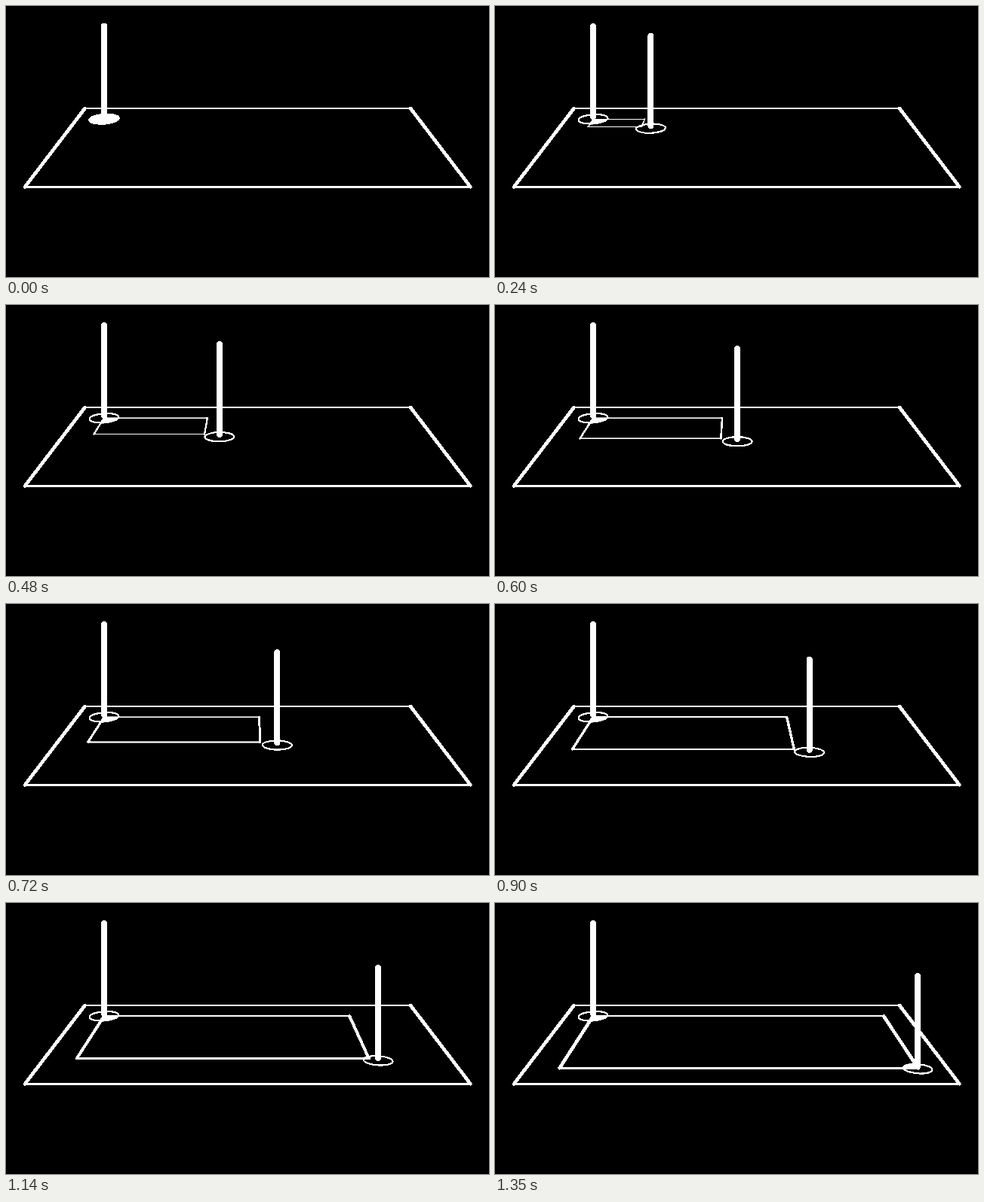
Recreate the animation shown at these times as an HTML page with a canvas. Size 640 by 360 pixels, loop 1800 ms.

```html
<!DOCTYPE html>
<html>
<head>
<meta charset="utf-8">
<style>
  html, body { margin: 0; height: 100%; overflow: hidden; background: #000; }
  /* High contrast turns smoothed edges into hard black and white pixels. */
  canvas { display: block; filter: contrast(60); }
</style>
</head>
<body>
<canvas id="stage" width="640" height="360"></canvas>
<script>
const ctx = document.getElementById('stage').getContext('2d');
const LOOP = 1800, STEP = 30, STEPS = 45;
const CENTER = 320, HORIZON = -145;

function line(x1, y1, x2, y2, width) {
  ctx.lineWidth = width;
  ctx.beginPath();
  ctx.moveTo(x1, y1);
  ctx.lineTo(x2, y2);
  ctx.stroke();
}

// Corners run clockwise from the back left.
function outline([a, b, c, d], back, front, side) {
  line(...a, ...b, back);
  line(...b, ...c, side);
  line(...c, ...d, front);
  line(...d, ...a, side);
}

function quadPath(corners) {
  const path = new Path2D();
  corners.forEach(point => path.lineTo(...point));
  path.closePath();
  return path;
}

function ringPath(x, y, tilt) {
  const path = new Path2D();
  path.ellipse(x, y, 19.5, 6.1, tilt * Math.PI / 180, 0, 2 * Math.PI);
  return path;
}

function fillOverlap(a, b) {
  ctx.save();
  ctx.clip(a);
  ctx.fill(b);
  ctx.restore();
}

// Inner rectangle lying on the floor, growing towards the viewer.
function floorRect(p) {
  const left = 130, right = 130 + 385 * p, top = 150.2;
  const scale = 1 / (1 - 0.1896 * p);
  const near = x => [CENTER + (x - CENTER) * scale, HORIZON + (top - HORIZON) * scale];
  return [[left, top], [right, top], near(right), near(left)];
}

function draw(p) {
  ctx.fillStyle = '#000';
  ctx.fillRect(0, 0, 640, 360);
  ctx.fillStyle = ctx.strokeStyle = '#fff';
  ctx.lineCap = 'round';

  outline([[104.6, 136], [536, 136], [615.5, 240.4], [25, 240.4]], 2, 3, 4.6);

  const corners = floorRect(p);
  outline(corners, 0.9 + 1.2 * p, 1 + 1.8 * p, 1 + 3.6 * p);

  const dx = 430 * p, dy = 70 * p;
  const rect = quadPath(corners);
  const fixed = ringPath(130, 150.2, -4);
  const moving = ringPath(130 + dx, 150.2 + dy, -4 + 9 * p);
  fillOverlap(fixed, rect);
  fillOverlap(moving, rect);
  fillOverlap(fixed, moving);
  ctx.lineWidth = 2.2;
  ctx.stroke(fixed);
  ctx.stroke(moving);

  line(130, 27, 130, 147, 8);
  line(130 + dx, 27 + dy, 130 + dx, 147 + dy, 8);
}

const start = performance.now();
function tick() {
  const t = (performance.now() - start) % LOOP;
  draw(Math.min(Math.floor(t / STEP), STEPS) / STEPS);
  requestAnimationFrame(tick);
}
tick();
</script>
</body>
</html>
```
